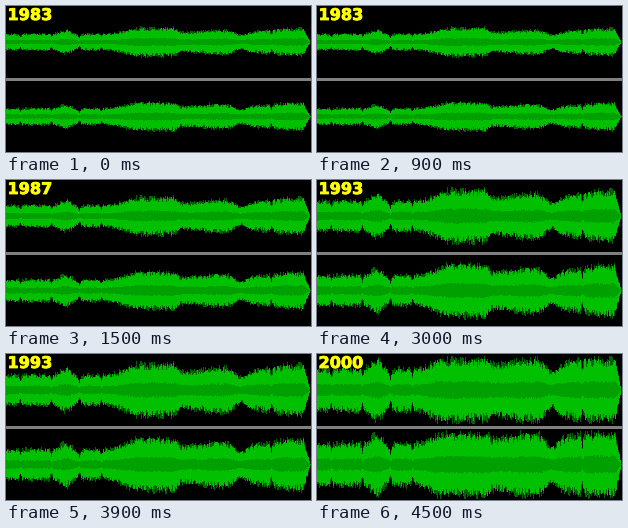
These frames come from a looping animation (305x146 px, 6 s). A matplotlib script:

```python
import numpy as np
import matplotlib.pyplot as plt
from matplotlib import patheffects
from matplotlib.animation import FuncAnimation
from matplotlib.patches import Rectangle

W, H, DPI = 305, 146, 100
PX = 72 / DPI
FRINGE, PEAK, BODY = "#006400", "#00c000", "#00a000"
YELLOW, GREY = "#ffff00", "#808080"

# One recording, mastered louder in each release
RELEASES = {"1983": 0.75, "1987": 1.0, "1993": 1.4, "2000": 1.95}
CEILING = 32

x = np.arange(W)


def bump(center, width):
    return np.exp(-((x - center) / width) ** 2)


def ramp(start, end):
    return np.clip((x - start) / (end - start), 0, 1)


def song_loudness():
    """Quiet verse, loud chorus, second verse and a rising finale."""
    verse = 11.5 + 5 * bump(59, 7) - 2 * bump(72, 4)
    chorus = 8 * ramp(105, 130) - 5.5 * ramp(168, 174)
    second = 3 * bump(213, 18) - 5 * bump(234, 7)
    finale = 5 * ramp(245, 285)
    pauses = 1 - 0.35 * sum(bump(c, 1.2) for c in (14, 45, 73, 95, 265))
    return (verse + chorus + second + finale) * pauses * ramp(304, 297)


loudness = song_loudness()


class Channel:
    def __init__(self, middle, seed):
        rng = np.random.default_rng(seed)
        self.middle = middle
        # Separate jitter above and below the middle line
        self.fringe = rng.uniform(0.8, 1.08, (2, W))
        self.peak = rng.uniform(0.72, 0.98, (2, W))
        self.body = rng.uniform(0.22, 0.29, (2, W))

    def draw(self, gain):
        level = np.minimum(loudness * gain, CEILING)
        for jitter, color in ((self.fringe, FRINGE), (self.peak, PEAK),
                              (self.body, BODY)):
            up, down = np.maximum(level * jitter, 0.5)
            draw_columns(self.middle - up, self.middle + down, color)


def draw_columns(top, bottom, color):
    """Fill whole pixel columns between two outlines."""
    top, bottom = (np.append(np.round(v), np.round(v[-1]))
                   for v in (top, bottom))
    ax.fill_between(np.arange(W + 1), top, bottom, step="post", color=color,
                    linewidth=0, antialiased=False)


channels = [Channel(36, 11), Channel(110.5, 29)]
fig = plt.figure(figsize=(W / DPI, H / DPI), dpi=DPI, facecolor="black")
ax = fig.add_axes([0, 0, 1, 1])


def draw(frame):
    year, gain = list(RELEASES.items())[frame]
    ax.clear()
    ax.set_xlim(0, W)
    ax.set_ylim(H, 0)
    ax.axis("off")
    for channel in channels:
        channel.draw(gain)
    ax.add_patch(Rectangle((0, 72), W, 3, color=GREY, linewidth=0,
                           antialiased=False))
    bold = patheffects.withStroke(linewidth=0.8 * PX, foreground=YELLOW)
    ax.text(1.5, 14, year, color=YELLOW, family="DejaVu Sans", weight="bold",
            size=16.1 * PX, va="baseline", path_effects=[bold])
    return ax.get_children()


anim = FuncAnimation(fig, draw, frames=len(RELEASES), interval=1500,
                     init_func=lambda: [], repeat=True, repeat_delay=0)
plt.show()
```
